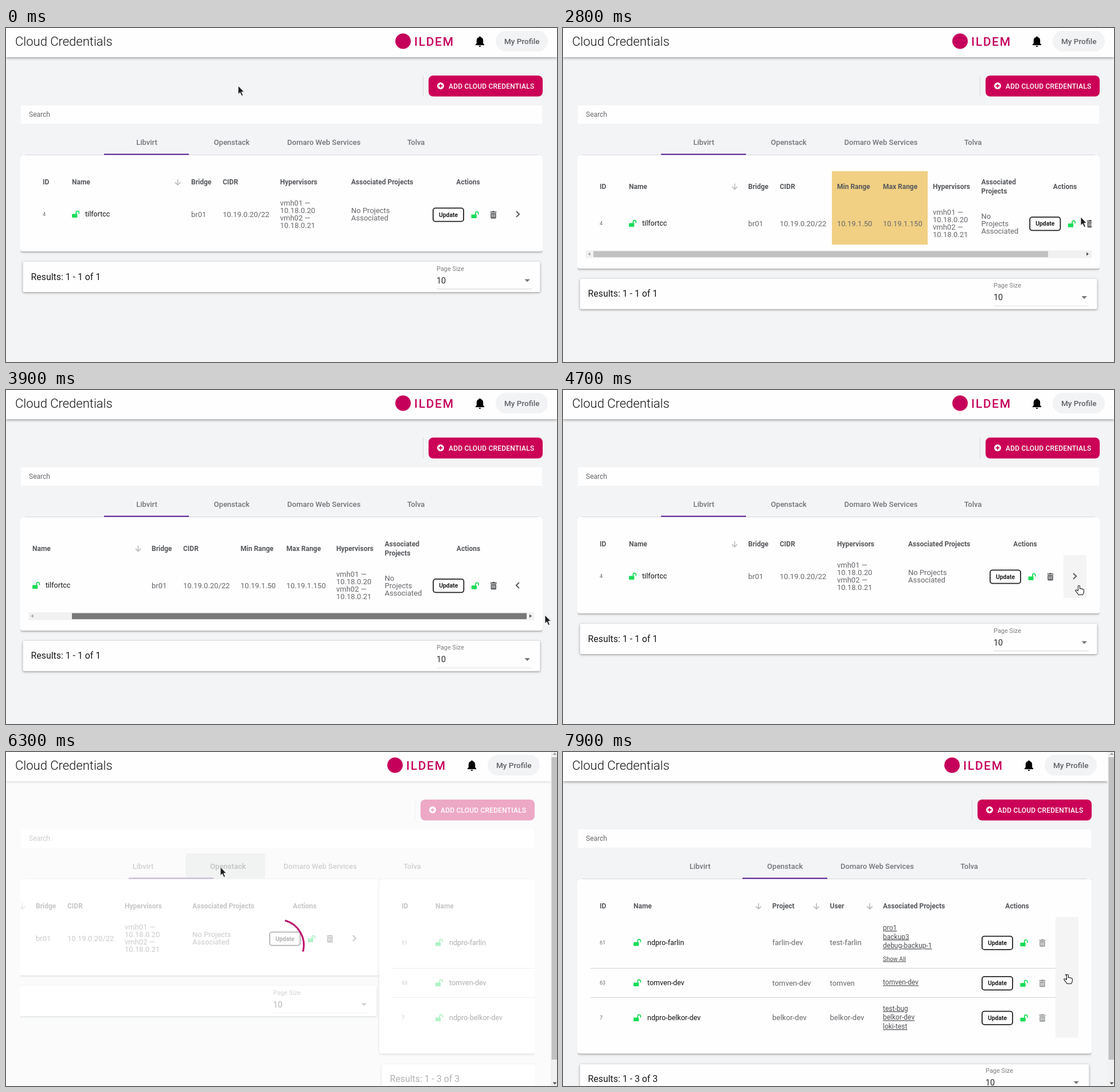
These frames come from a looping animation (961 by 583 pixels, 8000 ms). An HTML page:

```html
<!DOCTYPE html>
<html lang="en">
<head>
<meta charset="utf-8">
<title>Cloud Credentials</title>
<style>
html,body{margin:0;height:100%;overflow:hidden;background:#f3f4f6}
svg.stage{display:block;width:100vw;height:100vh}
text{font:400 13px Roboto,sans-serif;fill:#64676b}
.h{font-weight:700;font-size:12px;fill:#55585c}
.n{font-size:12.5px;fill:#111}
.i{font-size:9px}
.link{font-size:12px;text-decoration:underline;fill:#4c4f53}
.tab{font-weight:500;fill:#717478}
.mid{text-anchor:middle}
.res{font-size:15.9px;fill:#1b1b1b}
.card{fill:#fffefe;filter:drop-shadow(0 1px 1px #0003) drop-shadow(0 1px 2px #0004)}
.cell{fill:#f4f4f5}
.sort{stroke:#b4b6b8;stroke-width:1.5;fill:none}
.chev{stroke:#5a5d60;stroke-width:2;fill:none}
.rule{stroke:#d3d5d8}

/* every animation shares one 8 s clock; 1% = 80 ms */
.a{animation:8s step-end infinite}
.shift{animation-name:shift}
.shrink{animation-name:shrink}
.panel{animation-name:shrink,grow}
.hd{animation-name:headDown}
.rw{animation-name:rowDown}
.ft{animation-name:footDown}
.folded{animation-name:folded}
.full{animation-name:full}
.mark{animation-name:mark}
.hover1{animation-name:hover1}
.hover2{animation-name:hover2}
.hover3{animation-name:hover3}
.late{animation-name:late}
.load{animation-name:load}
.press{animation-name:press}
.picked{animation-name:picked}
.slide{animation-name:slide}
.bar{animation-name:bar}
.scroll{--end:-69px;animation-name:drag}
.thumb{--end:62px;animation-name:thumb,drag}
.spin{animation-name:spin}
.cursor{animation-name:cursor}
.arrow{animation-name:arrow}
.hand{animation-name:hand}

@keyframes shift{0%{transform:none}76.25%,100%{transform:translateX(var(--dx,-14px))}}
@keyframes shrink{0%{width:var(--w)}76.25%,100%{width:var(--n)}}
@keyframes grow{0%,58.75%,100%{height:168px}27.5%{height:198px}}
@keyframes headDown{0%,58.75%,100%{transform:none}27.5%{transform:translateY(7.5px)}}
@keyframes rowDown{0%,58.75%,100%{transform:none}27.5%{transform:translateY(16px)}}
@keyframes footDown{0%,58.75%,100%{transform:none}27.5%{transform:translateY(29.7px)}}
@keyframes folded{0%,58.75%,100%{visibility:visible}27.5%{visibility:hidden}}
@keyframes full{0%,58.75%,100%{visibility:hidden}27.5%{visibility:visible}}
@keyframes mark{0%,37.5%,100%{visibility:hidden}27.5%{visibility:visible}}
@keyframes hover1{0%,27.5%,63.75%,100%{visibility:hidden}20%,58.75%{visibility:visible}}
@keyframes hover2{0%,58.75%,100%{visibility:hidden}52.5%{visibility:visible}}
@keyframes hover3{0%{visibility:hidden}95%,100%{visibility:visible}}
@keyframes late{0%{visibility:hidden}76.25%,100%{visibility:visible}}
@keyframes load{0%,86.25%,100%{visibility:hidden}76.25%{visibility:visible}}
@keyframes press{0%,82.5%,100%{visibility:hidden}76.25%{visibility:visible}}
@keyframes picked{0%,98.75%,100%{fill:#717478}76.25%{fill:#4a4d50}}
@keyframes slide{0%{transform:none}78.75%{transform:translateX(-271px)}80%{transform:translateX(-712px)}
 81.25%{transform:translateX(-863px)}82.5%,100%{transform:translateX(-897px)}}
@keyframes bar{0%{transform:none}76.25%{transform:translateX(-6.5px)}78.75%{transform:translateX(43px)}
 80%{transform:translateX(130px)}81.25%,100%{transform:translateX(142px)}}
@keyframes drag{0%,58.75%,100%{transform:translateX(0)}
 43.75%{transform:translateX(0);animation-timing-function:steps(3,start)}
 47.5%{transform:translateX(var(--end))}}
@keyframes thumb{0%,50%,100%{fill:#c1c1c1}42.5%{fill:#787878}}
@keyframes spin{0%,76.25%{transform:rotate(0);animation-timing-function:steps(8)}86.25%,100%{transform:rotate(240deg)}}
@keyframes arrow{0%,23.75%,63.75%{visibility:visible}20%,56.25%,95%,100%{visibility:hidden}}
@keyframes hand{0%,23.75%,63.75%{visibility:hidden}20%,56.25%,95%,100%{visibility:visible}}
@keyframes cursor{
 0%,10%{transform:translate(405px,101px);animation-timing-function:steps(2,start)}
 12.5%{transform:translate(450px,112px);animation-timing-function:steps(4,start)}
 17.5%{transform:translate(790px,245px);animation-timing-function:steps(3,start)}
 21.25%{transform:translate(900px,307px);animation-timing-function:steps(1,start)}
 23.75%{transform:translate(900px,314px);animation-timing-function:steps(1,start)}
 32.5%{transform:translate(899px,315px);animation-timing-function:steps(3,start)}
 36.25%{transform:translate(903px,330px);animation-timing-function:steps(2,start)}
 38.75%{transform:translate(914px,362px);animation-timing-function:steps(2,start)}
 41.25%{transform:translate(885px,388px);animation-timing-function:steps(2,start)}
 43.75%{transform:translate(845px,392px);animation-timing-function:steps(5,start)}
 50%{transform:translate(940px,393px);animation-timing-function:steps(3,start)}
 53.75%,56.25%{transform:translate(907px,347px);animation-timing-function:steps(1,start)}
 62.5%{transform:translate(900px,341px);animation-timing-function:steps(3,start)}
 66.25%,67.5%{transform:translate(727px,323px);animation-timing-function:steps(3,start)}
 71.25%{transform:translate(350px,168px);animation-timing-function:steps(1,start)}
 72.5%{transform:translate(294px,158px);animation-timing-function:steps(2,start)}
 75%,82.5%{transform:translate(374px,201px);animation-timing-function:steps(4,start)}
 87.5%{transform:translate(442px,250px);animation-timing-function:steps(4,start)}
 92.5%{transform:translate(640px,330px);animation-timing-function:steps(2,start)}
 95%{transform:translate(800px,378px);animation-timing-function:steps(1,start)}
 96.25%{transform:translate(872px,392px);animation-timing-function:steps(1,start)}
 97.5%,100%{transform:translate(880px,388px)}
}
</style>
</head>
<body>
<svg class="stage" viewBox="0 0 961 583">
<defs>
  <g id="lock">
    <rect x="-6.5" y="-.5" width="9.3" height="6.5" rx="1" fill="#19dc57"/>
    <path d="M.8 0V-2.8a2.5 2.5 0 0 1 5 0V-.4" fill="none" stroke="#19dc57" stroke-width="1.7"/>
  </g>
  <path id="trash" fill="currentColor" fill-rule="evenodd" d="M-5.5-5.6h3.2l.8-1h3l.8 1h3.2v1.7h-11zM-4.7-3h9.4V5.3q0 1.2-1.2 1.2h-7q-1.2 0-1.2-1.2zM-2.9-1.4v6h1v-6zM-.5-1.4v6h1v-6zM1.9-1.4v6h1v-6z"/>
  <path id="sort" class="sort" d="M0-5V4.6M-4.6.4L0 5 4.6.4"/>
  <path id="chev" class="chev" d="M-2.5-5L2.7 0-2.5 5"/>
  <g id="acts">
    <rect x="-26.6" y="-11.6" width="53.2" height="23.2" rx="4" fill="#fff" stroke="#222" stroke-width="1.8"/>
    <text class="mid" y="3.6" style="font-weight:700;font-size:10.4px;fill:#222">Update</text>
    <use href="#lock" x="46.5"/>
    <use href="#trash" x="78.5"/>
  </g>
  <g id="size">
    <text x="751" y="423.6" style="font-size:11px;fill:#7b7e82">Page Size</text>
    <text x="751" y="445.6" style="font-size:14.4px;fill:#2a2a2a">10</text>
    <path d="M904.5 438.4h9.4l-4.7 4.8z" fill="#757575"/>
    <path class="rule" d="M751 455.5H917"/>
  </g>
  <clipPath id="body"><rect class="a shrink" x="25" y="222" width="911" height="361" style="--w:911px;--n:897px"/></clipPath>
  <clipPath id="port"><rect x="39" y="222" width="883" height="166"/></clipPath>
</defs>

<rect width="961" height="583" fill="#f3f4f6"/>

<!-- header -->
<rect class="a shrink" y="-6" width="961" height="57" fill="#fffefe" style="--w:961px;--n:950px;filter:drop-shadow(0 1px 2.5px #0007)"/>
<text x="16" y="30.5" style="font-weight:300;font-size:22px;fill:#111">Cloud Credentials</text>
<g class="a shift">
  <circle cx="692.5" cy="23" r="13.5" fill="#c5005b"/>
  <text x="712" y="31" style="font-weight:500;font-size:21px;letter-spacing:1.7px;fill:#c5005b">ILDEM</text>
  <path d="M826.5 14.5q1.4 0 1.4 1.6 4.3 1.1 4.3 6v4.7l2 2.2v1h-15.4v-1l2-2.2v-4.7q0-4.9 4.3-6 0-1.6 1.4-1.6zM824.5 31h4q-.3 2-2 2t-2-2z"/>
  <rect x="854" y="5" width="91" height="36" rx="18" fill="#f2f3f5"/>
  <text class="mid" x="899.7" y="27.8" style="font-weight:500;font-size:13.6px;fill:#5f6266">My Profile</text>
  <path d="M727.5 83V119" stroke="#d5d9df"/>
  <rect x="737" y="83" width="199" height="36.5" rx="8" fill="#cb0057"/>
  <circle cx="758" cy="101" r="6" fill="#fff"/>
  <path d="M758 97.7v6.6M754.7 101h6.6" stroke="#cb0057" stroke-width="1.8"/>
  <text x="772" y="105.6" style="font-weight:500;font-size:12px;letter-spacing:.2px;fill:#fff">ADD CLOUD CREDENTIALS</text>
</g>

<!-- search and tabs -->
<rect class="a shrink" x="26" y="135" width="909" height="32" fill="#fffefe" style="--w:909px;--n:895px"/>
<text x="40" y="154.8" style="font-size:12px">Search</text>
<rect class="a shrink" x="33" y="221" width="895" height="1" fill="#d3d7de" style="--w:895px;--n:881px"/>
<rect class="a press" x="313" y="177" width="139" height="44.5" rx="3" fill="#d6dcda"/>
<g class="a shift" style="--dx:-6.5px">
  <text class="tab mid" x="245.5" y="203.8">Libvirt</text>
  <text class="tab mid a picked" x="393.7" y="203.8">Openstack</text>
  <text class="tab mid" x="554.5" y="203.8">Domaro Web Services</text>
  <text class="tab mid" x="715" y="203.8">Tolva</text>
</g>
<rect class="a bar" x="171" y="219.5" width="148" height="2" fill="#561c8f"/>

<g clip-path="url(#body)"><g class="a slide">
  <!-- Libvirt -->
  <rect class="card a panel" x="25" y="222" width="911" height="168" rx="4" style="--w:911px;--n:897px"/>
  <g clip-path="url(#port)"><g class="a scroll">
    <rect class="a mark" x="469" y="250" width="167" height="128" fill="#f1d083"/>
    <g class="a hd">
      <text class="h" x="64" y="273.4">ID</text>
      <text class="h" x="115" y="273.4">Name</text>
      <use href="#sort" x="299.5" y="269"/>
      <text class="h" x="323" y="273.4">Bridge</text>
      <text class="h" x="378" y="273.4">CIDR</text>
    </g>
    <g class="a rw">
      <text class="i" x="64" y="328">4</text>
      <use href="#lock" x="121.5" y="325"/>
      <text class="n" x="138" y="329.2">tilfortcc</text>
      <text x="323" y="329.7">br01</text>
      <text x="378" y="329.7">10.19.0.20/22</text>
    </g>
    <g class="a folded">
      <text class="h" x="478" y="273.4">Hypervisors</text>
      <text y="310.2"><tspan x="478">vmh01 —</tspan><tspan x="478" dy="13">10.18.0.20</tspan><tspan x="478" dy="13">vmh02 —</tspan><tspan x="478" dy="13">10.18.0.21</tspan></text>
      <g class="a shift" style="--dx:-6px">
        <text class="h" x="602" y="273.4">Associated Projects</text>
        <text y="323.4"><tspan x="602">No Projects</tspan><tspan x="602" dy="13">Associated</tspan></text>
      </g>
      <g class="a shift">
        <rect class="cell a hover1" x="873" y="288" width="40" height="75"/>
        <text class="h mid" x="806" y="273.4">Actions</text>
        <use href="#acts" x="771.5" y="326" style="color:#505356"/>
        <use href="#chev" x="892.5" y="325"/>
      </g>
    </g>
    <g class="a full">
      <text class="h" x="478" y="281">Min Range</text>
      <text class="h" x="558" y="281">Max Range</text>
      <text class="h" x="645" y="281">Hypervisors</text>
      <text class="h" y="273.4"><tspan x="729.5">Associated</tspan><tspan x="729.5" dy="16">Projects</tspan></text>
      <text class="h mid" x="875.5" y="281">Actions</text>
      <text x="478" y="345.7">10.19.1.50</text>
      <text x="558" y="345.7">10.19.1.150</text>
      <text y="326.2"><tspan x="645">vmh01 —</tspan><tspan x="645" dy="13">10.18.0.20</tspan><tspan x="645" dy="13">vmh02 —</tspan><tspan x="645" dy="13">10.18.0.21</tspan></text>
      <text y="332.7"><tspan x="729.5">No</tspan><tspan x="729.5" dy="13">Projects</tspan><tspan x="729.5" dy="13">Associated</tspan></text>
      <rect class="cell a hover2" x="942" y="304" width="40" height="74"/>
      <use href="#acts" x="840.8" y="341.7" style="color:#505356"/>
      <use href="#chev" transform="translate(961.5 341) scale(-1 1)"/>
    </g>
  </g></g>
  <g class="a full">
    <rect x="39" y="388" width="883" height="13.5" fill="#f1f1f1"/>
    <rect class="a thumb" x="53" y="389.5" width="793" height="10.5"/>
    <path d="M47.5 391.5v6l-4-3z" fill="#a3a3a3"/>
    <path d="M913 391.5v6l4-3z" fill="#505050"/>
  </g>
  <g class="a ft">
    <rect class="card a shrink" x="29.5" y="408" width="902" height="53" rx="2" style="--w:902px;--n:888px"/>
    <text class="res" x="43.5" y="439.7">Results: 1 - 1 of 1</text>
    <g class="a shift"><use href="#size"/></g>
  </g>

  <!-- Openstack -->
  <g class="a late"><g transform="translate(897)">
    <rect class="card" x="25" y="222" width="897" height="304.5" rx="4"/>
    <rect class="cell a hover3" x="859" y="288" width="40" height="210.5"/>
    <text class="h" x="64" y="273.4">ID</text>
    <text class="h" x="123" y="273.4">Name</text>
    <text class="h" x="365" y="273.4">Project</text>
    <text class="h" x="465.5" y="273.4">User</text>
    <text class="h" x="558" y="273.4">Associated Projects</text>
    <text class="h mid" x="792" y="273.4">Actions</text>
    <use href="#sort" x="341" y="269"/>
    <use href="#sort" x="442" y="269"/>
    <use href="#sort" x="535" y="269"/>
    <path d="M48 377.5H859M48 428.5H859" stroke="#cfd1d3"/>
    <g style="color:#97999b">
      <text class="i" x="64" y="335.5">61</text>
      <use href="#lock" x="129.5" y="332.5"/>
      <text class="n" x="147" y="336.8">ndpro-farlin</text>
      <text x="365" y="337">farlin-dev</text>
      <text x="465.5" y="337">test-farlin</text>
      <text class="link" x="558" y="311">pro1</text>
      <text class="link" x="558" y="326.5">backup3</text>
      <text class="link" x="558" y="342.2">debug-backup-1</text>
      <text class="link" x="558" y="364.5" style="font-size:10.4px">Show All</text>
      <use href="#acts" x="757.5" y="333.3"/>

      <text class="i" x="64" y="406">63</text>
      <use href="#lock" x="129.5" y="403"/>
      <text class="n" x="147" y="407.3">tomven-dev</text>
      <text x="365" y="407.7">tomven-dev</text>
      <text x="465.5" y="407.7">tomven</text>
      <text class="link" x="558" y="406.3">tomven-dev</text>
      <use href="#acts" x="757.5" y="403.8"/>

      <text class="i" x="64" y="466.5">7</text>
      <use href="#lock" x="129.5" y="464"/>
      <text class="n" x="147" y="468.3">ndpro-belkor-dev</text>
      <text x="365" y="468.3">belkor-dev</text>
      <text x="465.5" y="468.3">belkor-dev</text>
      <text class="link" x="558" y="451.7">test-bug</text>
      <text class="link" x="558" y="467.3">belkor-dev</text>
      <text class="link" x="558" y="483">loki-test</text>
      <use href="#acts" x="757.5" y="464.2"/>
    </g>
    <use href="#chev" x="878.5" y="393"/>
    <rect class="card" x="29.5" y="545" width="888" height="53" rx="2"/>
    <text class="res" x="43.5" y="575.8">Results: 1 - 3 of 3</text>
    <use href="#size" x="-14" y="136.3"/>
  </g></g>
</g></g>

<!-- loading veil and spinner -->
<g class="a load">
  <rect y="51" width="950" height="532" fill="#fff" opacity=".66"/>
  <g transform="translate(475 337)">
    <path class="a spin" d="M-31.4-31.4A44.4 44.4 0 0 1 31.4-31.4" fill="none" stroke="#b9005f" stroke-width="2.8"/>
  </g>
</g>

<!-- page scrollbar -->
<g class="a late">
  <rect x="950" width="11" height="583" fill="#f1f1f1"/>
  <rect x="951.5" y="9" width="9.5" height="528" fill="#c1c1c1"/>
  <path d="M953.5 5h7l-3.5-4z" fill="#a3a3a3"/>
  <path d="M953.5 576.5h7l-3.5 4z" fill="#505050"/>
</g>

<g class="a cursor">
  <path class="a arrow" d="M0 0V14.5l3.3-3 2.7 6 2.4-1-2.7-5.9h4.4z" fill="#1c1c1c" stroke="#fff" stroke-width=".7"/>
  <path class="a hand" d="M-1.6 9.5V1.7a1.5 1.5 0 0 1 3 0V6c.8-.8 2.3-.5 2.6.3.9-.5 2.2-.2 2.4.7 1-.3 2 .2 2 1.2V11c0 3-1.5 3.5-1.8 5.5H-1C-1.5 14-4.500 12-6 9.600c-.8-1.500.8-2.400 2-1.400z" fill="#fff" stroke="#1c1c1c" stroke-width="1.1" stroke-linejoin="round"/>
</g>
</svg>
</body>
</html>
```
